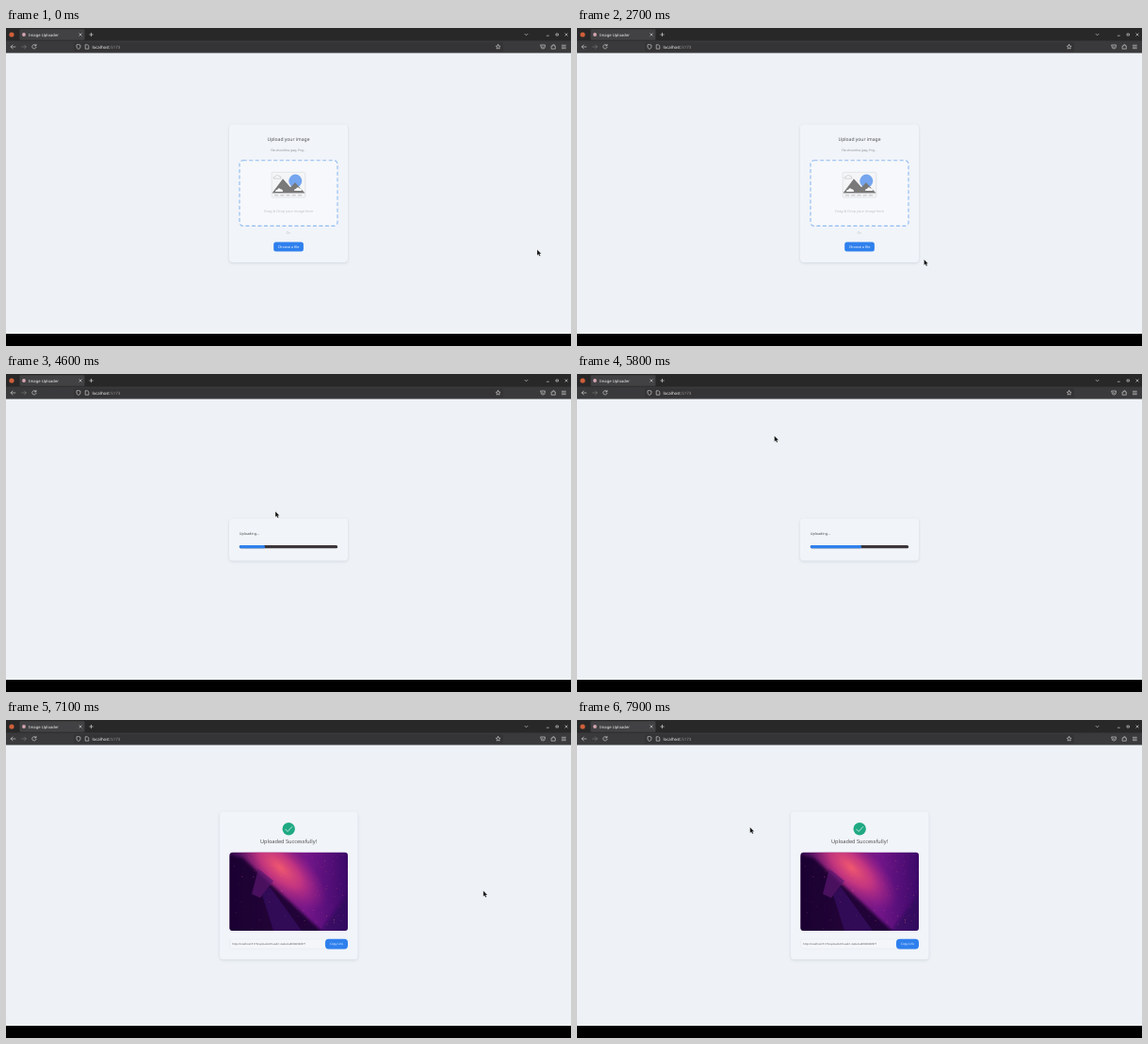
Animation of 600 by 338 pixels, one loop 8000 ms. Source, as an HTML page:

```html
<!DOCTYPE html>
<html lang="en">
<head>
<meta charset="utf-8">
<title>Image Uploader</title>
<style>
  html, body { margin: 0; width: 100%; height: 100%; overflow: hidden; background: #000; }
  svg { display: block; width: 100vw; height: 100vh; }
  text { font-family: "Noto Sans", "Open Sans", sans-serif; text-rendering: geometricPrecision; }
  .mid { text-anchor: middle; }
  .line { fill: none; stroke: #d2d2d2; stroke-width: .65; stroke-linecap: round; stroke-linejoin: round; }
  .card { fill: #f1f4f9; filter: drop-shadow(0 1px 1.6px rgba(50, 70, 100, .15)); }
  .small { font-size: 3.125px; }
  .body { font-size: 3.75px; }
  .blue { fill: #2f80ed; }
  .on-blue { fill: #f4f8ff; }
</style>
</head>
<body>
<svg viewBox="0 0 600 338" preserveAspectRatio="none">
  <defs>
    <linearGradient id="night">
      <stop offset="0" stop-color="#3a0c52"/>
      <stop offset=".35" stop-color="#7d1c78"/>
      <stop offset=".65" stop-color="#74168a"/>
      <stop offset="1" stop-color="#3a0968"/>
    </linearGradient>
    <radialGradient id="glow">
      <stop offset="0" stop-color="#f0586e"/>
      <stop offset=".45" stop-color="#d43b80" stop-opacity=".8"/>
      <stop offset="1" stop-color="#a5238a" stop-opacity="0"/>
    </radialGradient>
    <filter id="soft"><feGaussianBlur stdDeviation="1.6"/></filter>
    <clipPath id="photoBox"><rect x="237.5" y="140.7" width="125.5" height="83.3" rx="3.2"/></clipPath>
    <path id="cross" d="M-1.2-1.2l2.4 2.4m0-2.4l-2.4 2.4"/>
    <path id="back" d="M2.4 0h-4.8m2-2l-2 2 2 2"/>
    <path id="cloud" d="M-4 2q0-2.4 2-2 1.5-3 3.4-.8 2.6-.4 2.6 2.8z"/>
  </defs>

  <!-- browser -->
  <rect width="600" height="14" fill="#292829"/>
  <rect y="13.5" width="600" height="13" fill="#3a393b"/>
  <rect x="14.5" y="1.3" width="69" height="11.4" rx="1.3" fill="#424143"/>
  <rect x="72" y="15.2" width="456" height="9.8" rx="1.3" fill="#343335"/>
  <circle cx="6" cy="7" r="2.6" fill="#cf5f38"/>
  <circle cx="19" cy="7" r="1.9" fill="#d5a5b0"/>
  <text x="24" y="8.6" font-size="4.2" fill="#eee">Image Uploader</text>
  <text x="91.4" y="21.5" font-size="4.4" fill="#f4f4f4">localhost<tspan fill="#9a999c">:5173</tspan></text>
  <g class="line">
    <use href="#cross" x="79" y="7"/>
    <use href="#cross" x="595" y="7"/>
    <use href="#cross" transform="translate(90.5 7) rotate(45)"/>
    <use href="#back" x="7.5" y="20"/>
    <use href="#back" transform="translate(19 20) scale(-1 1)" opacity=".4"/>
    <path d="M551 6.3l1.5 1.5 1.5-1.5M574.3 8.2h2M584.4 6h2v2h-2z"/>
    <path d="M31.8 18.6a2.2 2.2 0 1 0 .3 1.8M32 17.4v1.5h-1.6"/>
    <path d="M77 17.6l2 .6v1.9q0 1.5-2 2.4-2-.9-2-2.4v-1.9z"/>
    <path d="M84.6 17.8h2l1.2 1.2v3.2h-3.2z"/>
    <path id="star"/>
    <path d="M568 18h4.4v1.8a2.2 2.2 0 0 1-4.4 0zM569.2 19.6l1 .9 1-.9"/>
    <path d="M579.5 19h1.3v-1.2h1.4V19h1.1v3.2h-3.8zM590.3 18.3h4m-4 1.7h4m-4 1.7h4"/>
  </g>
  <rect y="26.5" width="600" height="298.5" fill="#eef2f6"/>

  <g id="pick">
    <rect class="card" x="237" y="102.5" width="126" height="146.5" rx="3.7"/>
    <text class="mid" x="300" y="120.4" font-size="5" fill="#4f4f4f">Upload your image</text>
    <text class="mid small" x="299.3" y="130.6" fill="#828282">File should be jpeg, Png..</text>
    <rect id="zone" x="248" y="140.8" width="104" height="69.6" rx="3.7" fill="#f6f8fb" stroke-width="1.1" stroke-dasharray="4 2.5"/>
    <rect x="282.2" y="153.3" width="35.6" height="26.7" rx="1.2" fill="#f4f5f7" stroke="#cfd2d6" stroke-width=".5"/>
    <circle cx="307.3" cy="162.6" r="7" fill="#74a5ee"/>
    <path d="M282.6 175.5L294 160.3l8 9 5-5 10.5 11.2z" fill="#797979"/>
    <g fill="#f7f7f7">
      <use href="#cloud" x="290" y="172"/>
      <use href="#cloud" x="310" y="171"/>
      <use href="#cloud" x="288" y="158" stroke="#a9abae" stroke-width=".45"/>
    </g>
    <path d="M285 177.8h30" stroke="#a5a7aa" stroke-width=".7" stroke-dasharray="4.2 2"/>
    <text class="mid body" x="300" y="196" fill="#c0c1c4">Drag &amp; Drop your image here</text>
    <text class="mid body" x="299.8" y="219.2" fill="#bdbdbd">Or</text>
    <rect class="blue" x="284.2" y="227.4" width="31.7" height="10.2" rx="2.5"/>
    <text class="mid body on-blue" x="300" y="233.8">Choose a file</text>
  </g>

  <g id="load">
    <rect class="card" x="237" y="153.5" width="126" height="45" rx="3.7"/>
    <text class="body" x="247.7" y="171.2" fill="#4f4f4f">Uploading...</text>
    <rect x="247.8" y="182" width="104.4" height="3.3" rx="1.65" fill="#3a353b"/>
    <rect id="bar" class="blue" x="247.8" y="182" height="3.3" rx="1.5"/>
  </g>

  <g id="done">
    <rect class="card" x="227" y="97.3" width="146.5" height="157.2" rx="3.7"/>
    <circle cx="300.2" cy="115.7" r="6.7" fill="#1fa983"/>
    <path d="M296.5 115.9l2.6 2.6 4.9-5.3" fill="none" stroke="#e8f7f2" stroke-width=".75"/>
    <text class="mid" x="300" y="130.6" font-size="5.625" fill="#4f4f4f">Uploaded Successfully!</text>
    <g clip-path="url(#photoBox)">
      <rect x="237" y="140" width="127" height="85" fill="url(#night)"/>
      <ellipse rx="62" ry="27" transform="translate(291 157) rotate(42)" fill="url(#glow)"/>
      <path d="M230 141l22 6 86 80H230z" fill="#14052f" opacity=".88" filter="url(#soft)"/>
      <path d="M268 158l-7 27 9 4 14-18z" fill="#5b1670" opacity=".7"/>
      <path d="M272 186l8-9 34 47h-30z" fill="#3a1068" opacity=".65"/>
      <path d="M363 185v40h-30z" fill="#2a0758" opacity=".6" filter="url(#soft)"/>
      <g id="dust"></g>
    </g>
    <rect x="237.7" y="233.1" width="125.2" height="10" rx="2.5" fill="#f4f6fa" stroke="#dfe2e8" stroke-width=".35"/>
    <text x="240" y="239.1" font-size="2.8125" fill="#5c5d63">http://localhost:5173/uploads/29-eab1-4a6e-ba8f6060bf87f</text>
    <rect class="blue" x="339" y="232.8" width="24" height="10.6" rx="3.7"/>
    <text class="mid small on-blue" x="351" y="239.2">Copy Link</text>
  </g>

  <g id="cursor">
    <path id="arrow" d="M0 0v6.1l1.4-1.2 1 2.1 1.2-.6-1-2h1.9z" fill="#111" stroke="#fff" stroke-opacity=".75" stroke-width=".35"/>
    <rect id="grab" x="-1.8" y="-2" width="4.4" height="4.2" rx="1.2" fill="#16181c"/>
  </g>
</svg>
<script>
const LOOP = 8000, STEP = 100;
const AWAY = 400, BACK = 2400, DRAG = 3300, DROP = 4100, DONE = 7100;
const BAR_START = 2, BAR_GROWTH = 64, BAR_TAU = 1000;
const el = id => document.getElementById(id);

// pointer moves: begin, end, then the place reached; it rests in between
const home = [564, 235.6];
const moves = [
  [0, 300, 199, 313],
  [2300, 2400, 93, 299],
  [2400, 2700, 368.5, 246],
  [2700, 3200, 356, 240],
  [3200, 3900, 304, 157],
  [4100, 4600, 286, 146],
  [4700, 5100, 163, 75],
  [5100, 5400, 209.6, 65.8],
  [5800, 6000, 190, 84],
  [6300, 6600, 163, 134],
  [6600, 7200, 575.6, 191],
  [7200, 7600, 345, 234],
  [7600, 7900, 183.7, 114]
];

function pointer(t) {
  let [px, py] = home;
  for (const [begin, end, x, y] of moves) {
    if (t <= begin) break;
    const p = Math.min(1, (t - begin) / (end - begin));
    px += (x - px) * p;
    py += (y - py) * p;
  }
  return [px, py];
}

function show(id, on) {
  el(id).style.display = on ? "" : "none";
}

function starPath(cx, cy, r) {
  const points = Array.from({ length: 10 }, (_, i) => {
    const a = i * Math.PI / 5, d = i % 2 ? r / 2 : r;
    return [cx + d * Math.sin(a), cy - d * Math.cos(a)];
  });
  return `M${points.join("L")}z`;
}

// fixed sprinkle of glowing specks over the picture
function sprinkle(count) {
  let seed = 7;
  const rand = () => (seed = seed * 16807 % 2147483647) / 2147483647;
  for (let i = 0; i < count; i++) {
    const dot = document.createElementNS("http://www.w3.org/2000/svg", "circle");
    const look = {
      cx: 238 + rand() * 125, cy: 141 + rand() * 83, r: .2 + rand() * .35,
      fill: i % 3 ? "#d8408c" : "#f07a68", opacity: .2 + rand() * .45
    };
    for (const key in look) dot.setAttribute(key, look[key]);
    el("dust").append(dot);
  }
}

function draw(now) {
  const t = Math.floor(now % LOOP / STEP) * STEP;
  const drag = t >= DRAG && t < DROP;
  const loaded = Math.max(0, t - DROP);
  show("pick", t < DROP);
  show("load", t >= DROP && t < DONE);
  show("done", t >= DONE);
  show("cursor", t < AWAY || t >= BACK);
  show("arrow", !drag);
  show("grab", drag);
  el("zone").setAttribute("stroke", drag ? "#4673cf" : "#8fbaf0");
  el("bar").setAttribute("width", BAR_START + BAR_GROWTH * (1 - Math.exp(-loaded / BAR_TAU)));
  el("cursor").setAttribute("transform", `translate(${pointer(t)})`);
}

let start;
function tick(now) {
  start ??= now;
  draw(now - start);
  requestAnimationFrame(tick);
}

el("star").setAttribute("d", starPath(522.6, 20.1, 2.5));
sprinkle(140);
draw(0);
requestAnimationFrame(tick);
</script>
</body>
</html>
```
